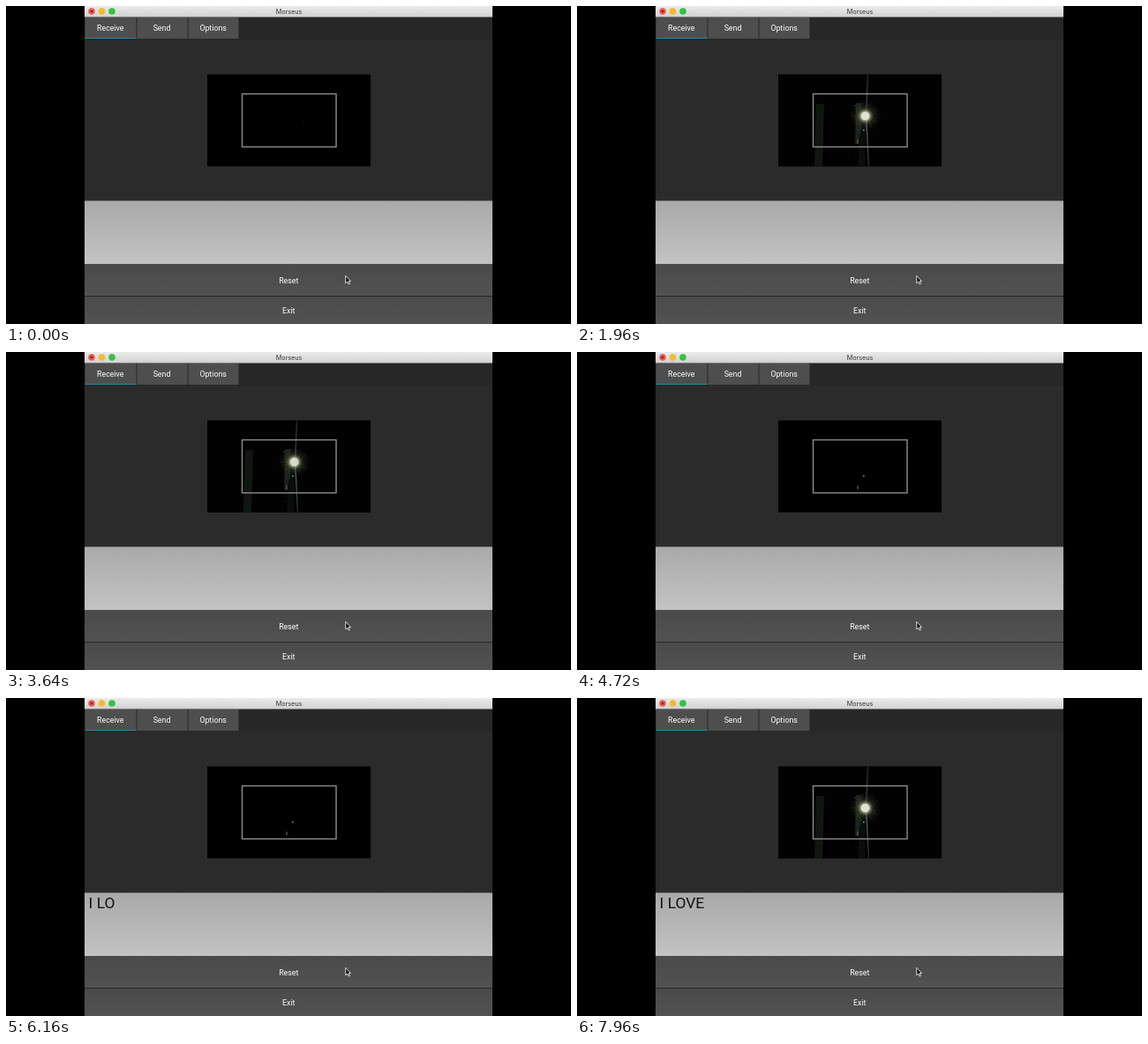
Animation, 640 px wide and 360 px high, one loop 8 s. Source, as an HTML page:

```html
<!DOCTYPE html>
<html lang="en">
<head>
<meta charset="utf-8">
<title>Morse receiver</title>
<style>
html, body { margin: 0; width: 100%; height: 100%; overflow: hidden; background: #000; }
svg { display: block; width: 640px; height: 360px; }
text { font-family: Roboto, sans-serif; font-size: 8.8px; fill: #fff; text-anchor: middle; }
#title { font: 7.2px Inter, sans-serif; fill: #333; }
#message { font-size: 17.4px; fill: #111; text-anchor: start; white-space: pre; }
</style>
</head>
<body>
<svg viewBox="0 0 640 360">
  <defs>
    <linearGradient id="bar" x2="0" y2="1"><stop stop-color="#ebebeb"/><stop offset="1" stop-color="#d1d1d1"/></linearGradient>
    <linearGradient id="paper" x2="0" y2="1"><stop stop-color="#a9a9a9"/><stop offset="1" stop-color="#c3c3c3"/></linearGradient>
    <linearGradient id="button" x2="0" y2="1"><stop stop-color="#4a4a4a"/><stop offset="1" stop-color="#525252"/></linearGradient>
    <radialGradient id="glow">
      <stop stop-color="#fffff0"/><stop offset=".22" stop-color="#fffff0"/>
      <stop offset=".32" stop-color="#a9b386" stop-opacity=".8"/>
      <stop offset=".5" stop-color="#4c5638" stop-opacity=".4"/>
      <stop offset="1" stop-color="#222a1c" stop-opacity="0"/>
    </radialGradient>
    <linearGradient id="streak" x2="0" y2="1"><stop stop-color="#1d2c30"/><stop offset=".45" stop-color="#708088"/><stop offset="1" stop-color="#26343a"/></linearGradient>
  </defs>

  <rect x="89" width="462" height="360" fill="#2b2b2b"/>
  <rect x="89" y="12" width="462" height="26" fill="#272727"/>
  <rect x="89" width="462" height="12.5" fill="url(#bar)"/>
  <circle cx="97" cy="6" r="3.8" fill="#ed5b53"/><circle cx="97" cy="6" r="1.5" fill="#8d2420"/>
  <circle cx="108.5" cy="6" r="3.8" fill="#f4bb30"/>
  <circle cx="120" cy="6" r="3.8" fill="#30c340"/>
  <text id="title" x="320.5" y="8.6">Morseus</text>

  <path d="M89.5 13H147.5V37H89.5ZM148.5 13H205.5V37H148.5ZM206.5 13H263.5V37H206.5Z" fill="#4e4e4e"/>
  <path d="M89.5 36.5H147.5" stroke="#2d88a5"/>
  <text x="118.3" y="28">Receive</text>
  <text x="176.5" y="28">Send</text>
  <text x="234.6" y="28">Options</text>

  <rect x="228" y="77.5" width="185" height="104" fill="#000"/>
  <svg x="228" y="77.5" width="185" height="104" viewBox="228 77.5 185 104">
    <g id="lit">
      <path d="M228 77.5H413V181.5H228Z" fill="#040304"/>
      <path d="M271 111H280L278 182H269Z" fill="#141a14"/>
      <path d="M316 110H322V142L318 156H315Z" fill="#202820"/>
      <path d="M320 145L326 141V182H318Z" fill="#0c100e"/>
      <path d="M328.8 77.5L327.2 119H328L330.2 77.5ZM327 129L329.8 182H331L328.5 129Z" fill="url(#streak)"/>
      <path id="rays" stroke="#69744e" stroke-width=".5" opacity=".5"/>
      <circle cx="326.5" cy="124.5" r="18" fill="url(#glow)"/>
      <circle cx="326.5" cy="124.5" r="4.5" fill="#fffff2"/>
      <circle cx="315" cy="113" r=".8" fill="#38688e"/>
      <circle cx="316" cy="169" r=".6" fill="#263c58"/>
      <path d="M318 151V156" stroke="#b2694c"/>
      <circle cx="324.8" cy="140.4" r="1" fill="#7ab7c4"/>
    </g>
    <g id="residue">
      <circle cx="324.8" cy="140.4" r="1" fill="#699476"/>
      <path d="M318 151.5V155.5" stroke="#8c8c86" stroke-width=".9"/>
    </g>
    <circle id="speck" cx="337" cy="131" r=".6" fill="#343434"/>
  </svg>
  <rect x="267.5" y="99.5" width="106.5" height="60" fill="none" stroke="#8d8d8d" stroke-width="1.4"/>

  <rect x="89" y="220.5" width="462" height="72" fill="url(#paper)"/>
  <text id="message" x="93.6" y="238.4"></text>
  <rect x="89" y="292.5" width="462" height="67.5" fill="#262626"/>
  <rect x="89" y="293" width="462" height="35" fill="url(#button)"/>
  <rect x="89" y="329" width="462" height="31" fill="url(#button)"/>
  <text x="320.3" y="314">Reset</text>
  <text x="320.3" y="348">Exit</text>
  <path d="M384.7 305.3V313.8L386.7 312.1L388 315L389.4 314.4L388.1 311.6H390.5Z" fill="#111" stroke="#fff" stroke-width=".8"/>
</svg>
<script>
const LOOP = 8000, UNIT = 120, START = 712;
const CODE = '.. / .-.. --- ...- . / -.--';
const MESSAGES = [[7200, 'I LOVE'], [6720, 'I LOV'], [5400, 'I LO'], [0, '']];
const el = id => document.getElementById(id);
const lit = el('lit'), residue = el('residue'), speck = el('speck'), message = el('message');

// Morse timing: symbol gap 1, letter gap 3, word gap 7 units
const pulses = [];
let at = 0;
for (const c of CODE) {
  if (c === ' ') at += 2;
  else if (c === '/') at += 2;
  else {
    const length = c === '-' ? 3 : 1;
    pulses.push([START + at * UNIT, START + (at + length) * UNIT]);
    at += length + 1;
  }
}

let rays = '';
for (let i = 0; i < 24; i++) {
  const a = i * Math.PI / 12, r = 9 + (i * 7 % 5) * 1.7;
  rays += `M326.5 124.5l${(r * Math.cos(a)).toFixed(1)} ${(r * Math.sin(a)).toFixed(1)}`;
}
el('rays').setAttribute('d', rays);

const show = (node, on) => node.setAttribute('opacity', +on);

function draw(now) {
  const t = now % LOOP;
  const pulse = pulses.findLast(p => p[0] <= t);
  const on = pulse && t < pulse[1];
  const dark = pulse && !on ? t - pulse[1] : Infinity;
  show(lit, on ? 1 - 0.15 * Math.min(1, (t - pulse[0]) / 60) : 0);
  show(residue, dark < 80);
  show(speck, t < 40 || (dark >= 80 && dark < 160));
  const text = MESSAGES.find(m => t >= m[0])[1];
  if (message.textContent !== text) message.textContent = text;
}

const begin = performance.now();
function tick() {
  draw(performance.now() - begin);
  requestAnimationFrame(tick);
}
tick();
</script>
</body>
</html>
```
